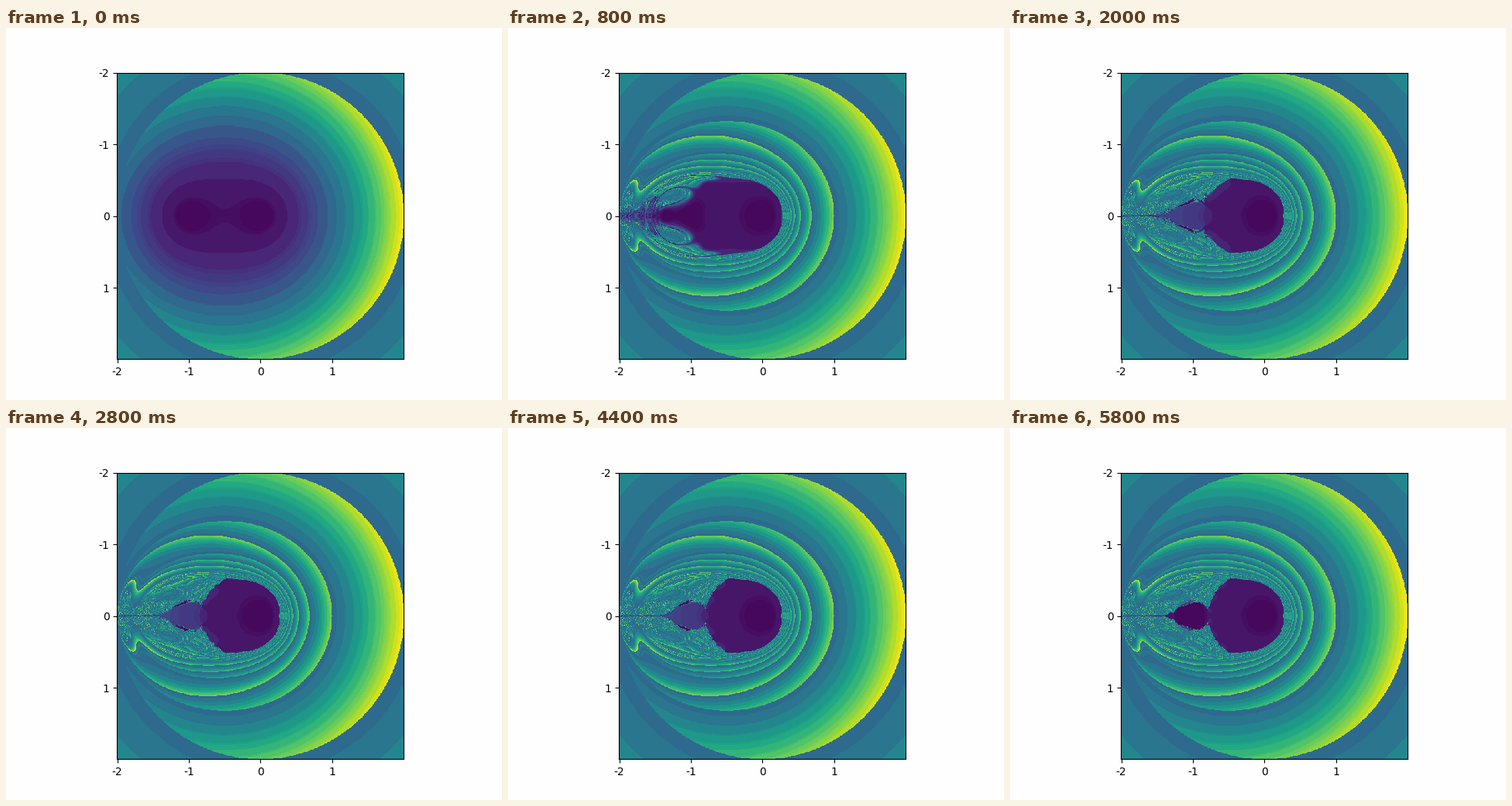
Recreate the animation shown at these times as a matplotlib script. Size 640 by 480 pixels, loop 6 s.

```python
import matplotlib.pyplot as plt
import numpy as np
from matplotlib.animation import FuncAnimation
from matplotlib.colors import ListedColormap

FRAMES, INTERVAL = 30, 200
N = 512

axis = np.linspace(-2, 2, N, endpoint=False)
c = (axis[None, :] + 1j * axis[:, None]).ravel()


def orbit_sizes():
    """Frame k takes k + 1 steps of z -> z^2 + c, then folds z to |z|.

    A point stays fixed once |z| > 2.
    """
    z = c.copy()
    live = np.flatnonzero(np.abs(z) <= 2)
    sizes = []
    for k in range(FRAMES):
        for _ in range(k + 1):
            z[live] = z[live] ** 2 + c[live]
            live = live[np.abs(z[live]) <= 2]
        z = np.abs(z).astype(complex)
        sizes.append(z.real.reshape(N, N).copy())
    return sizes


VIRIDIS = plt.get_cmap("viridis")(np.arange(256), bytes=True)[:, :3].astype(int)
CELL_ID = (VIRIDIS >> np.array([5, 4, 5])) @ np.array([256, 16, 1])


def banded_cmap(data, vmax):
    """Viridis merged into coarse RGB cells, each shown in its mean colour."""
    idx = np.clip((data / vmax * 256).astype(int), 0, 255)
    weight = np.bincount(idx.ravel(), minlength=256) + 1e-3
    colors = np.empty((256, 3))
    for cell in np.unique(CELL_ID):
        m = CELL_ID == cell
        mean = np.average(VIRIDIS[m], axis=0, weights=weight[m])
        colors[m] = np.floor(mean + 1e-6)
    return ListedColormap(colors / 255)


sizes = orbit_sizes()
vmax = sizes[0].max()
cmaps = [banded_cmap(s, vmax) for s in sizes]

paper = (254 / 255,) * 3
fig, ax = plt.subplots(figsize=(6.4, 4.8), dpi=100, facecolor=paper)
img = ax.imshow(sizes[0], cmap=cmaps[0], vmin=0, vmax=vmax,
                interpolation="nearest")
ticks = range(0, N, N // 4)
labels = ["-2", "-1", "0", "1"]
ax.set_xticks(ticks, labels)
ax.set_yticks(ticks, labels)


def update(k):
    img.set_data(sizes[k])
    img.set_cmap(cmaps[k])
    return [img]


anim = FuncAnimation(fig, update, frames=FRAMES, interval=INTERVAL,
                     repeat=True, repeat_delay=0)
plt.show()
```
